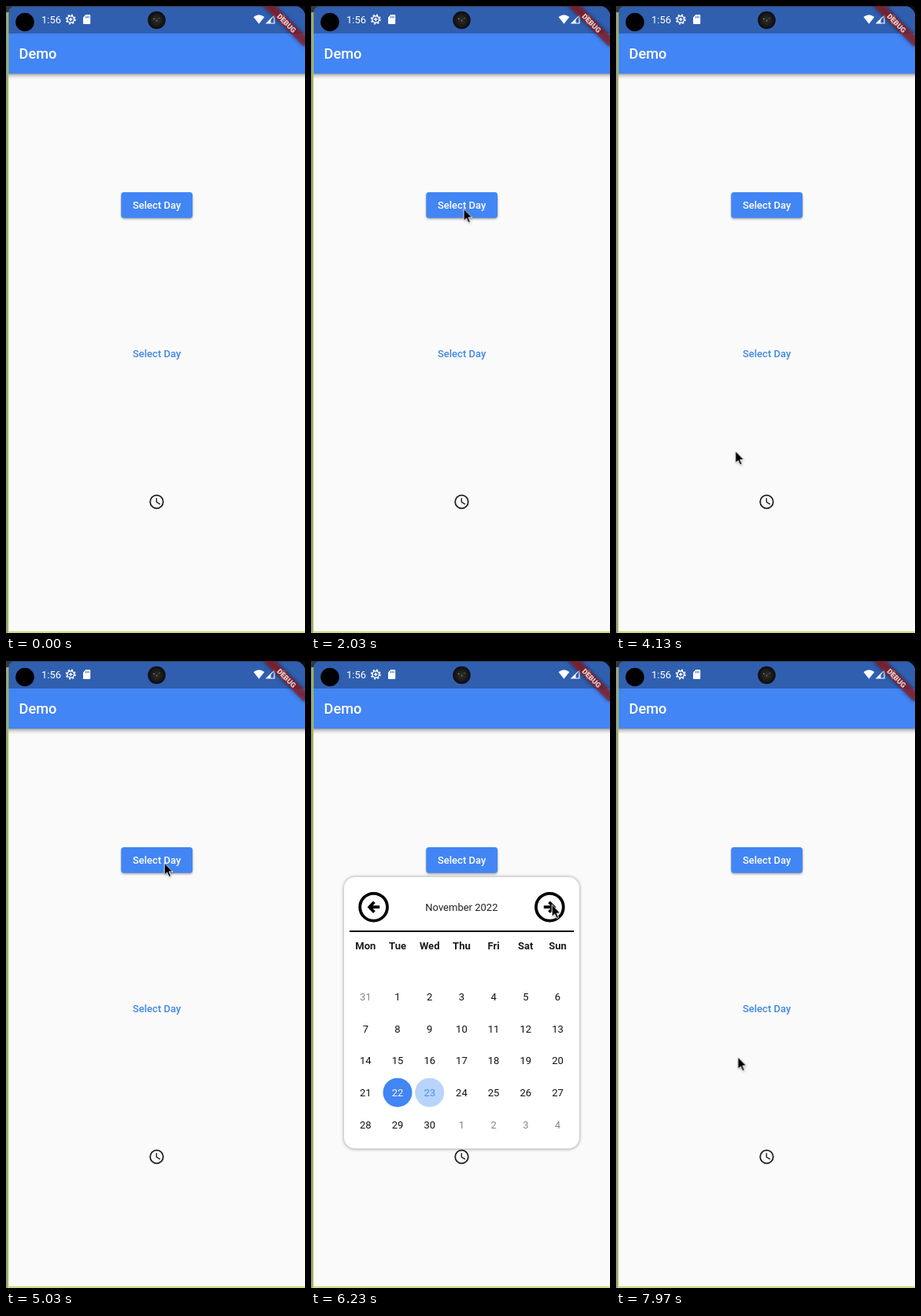
An HTML page that plays this animation: 380 px wide and 798 px high, repeating every 8000 ms.

```html
<!DOCTYPE html>
<html lang="en">
<head>
<meta charset="utf-8">
<title>Day picker demo</title>
<style>
  html, body { margin: 0; width: 100%; height: 100%; overflow: hidden; background: #fafafa; }
  svg { display: block; width: 100%; height: 100%; }
  text { font-family: Roboto, sans-serif; font-size: 13px; }
  .mid { text-anchor: middle; }
  .medium { font-weight: 500; }
  .bold { font-weight: 700; }
</style>
</head>
<body>
<svg viewBox="0 0 380 798" preserveAspectRatio="none">
  <defs>
    <linearGradient id="fall" x2="0" y2="1">
      <stop offset="0" stop-opacity=".38"/>
      <stop offset=".4" stop-opacity=".14"/>
      <stop offset="1" stop-opacity="0"/>
    </linearGradient>
    <radialGradient id="lens">
      <stop offset="0" stop-color="#30302c"/>
      <stop offset=".6" stop-color="#1b1b1a"/>
      <stop offset="1" stop-color="#0c0c0e"/>
    </radialGradient>
    <filter id="soft" x="-20%" y="-60%" width="140%" height="220%"><feGaussianBlur stdDeviation="1.5"/></filter>
    <filter id="halo" x="-5%" y="-5%" width="110%" height="110%"><feGaussianBlur stdDeviation="2"/></filter>
    <filter id="blur" x="-20%" y="-80%" width="140%" height="260%"><feGaussianBlur stdDeviation="2.5"/></filter>
    <clipPath id="pane"><rect x="49" y="347" width="285" height="268"/></clipPath>
    <g id="arrow" fill="none" stroke="#000">
      <circle r="17.4" stroke-width="3.8"/>
      <path d="M.8-6.4-5.4 0 .8 6.4M-4.5 0H7.6" stroke-width="3.8"/>
    </g>
  </defs>

  <!-- screen and bars -->
  <rect width="380" height="798" fill="#fafafa"/>
  <rect x="3" y="86" width="377" height="7" fill="url(#fall)"/>
  <rect x="3" y="35" width="377" height="51" fill="#4285f4"/>
  <rect x="3" width="377" height="35" fill="#305fb0"/>
  <rect width="2" height="798" fill="#969a94"/>
  <path d="M2.6 8V796.9H380" fill="none" stroke="#a9cb35" stroke-width="1.3"/>
  <path d="M0 0H380V.8H9Q4 2 3 8H0Z" fill="#35383c"/>
  <path d="M370 0H380V10Q378 3 370 0Z" fill="#0b0b0d"/>
  <circle cx="24" cy="20.5" r="11.8"/>
  <circle cx="191.5" cy="18" r="11.3" fill="url(#lens)"/>
  <path d="M187 16.4h1.6M191 18.6h1.2M194.5 15.5h1" stroke="#8d8d80" stroke-width="1.2"/>

  <!-- status icons -->
  <g fill="#fff">
    <text x="45" y="22">1:56</text>
    <g transform="translate(82.3 17)" fill="none" stroke="#fff">
      <circle r="4.3" stroke-width="1.4"/>
      <circle r="5.7" stroke-width="1.6" stroke-dasharray="2.2 2.277"/>
      <path d="M-2.2 0H2.2M0-2.2V2.2" stroke-width="1.3"/>
    </g>
    <path d="M101.4 11H106.2Q107.2 11 107.2 12V22Q107.2 23 106.2 23H99Q98 23 98 22V14.5Z"/>
    <path d="M101.4 13v2.4M103.3 13v2.4M105.2 13v2.4" stroke="#305fb0" stroke-width=".9"/>
    <path d="M321.5 22.7 314.6 14.1Q321.5 8.3 328.4 14.1Z"/>
    <path d="M341 12.2V22H331.2Z" fill="none" stroke="#fff" stroke-width="1.2"/>
    <path d="M336.5 16.6V22h-5Z"/>
    <path d="M350 12.6h1.3v-1.2h2.4v1.2h1.3V23h-5Z"/>
  </g>
  <g transform="translate(378.5 0) rotate(45)">
    <rect x="-36.4" y="25.5" width="72.8" height="10.9" opacity=".5" filter="url(#blur)"/>
    <rect x="-36.4" y="25.5" width="72.8" height="10.9" fill="#a51a1c" fill-opacity=".63"/>
    <text class="mid" y="34.3" fill="#e6d3d6" style="font-size:9.2px;font-weight:900">DEBUG</text>
  </g>

  <!-- page -->
  <text class="medium" x="16.6" y="67.4" fill="#fff" style="font-size:18.2px">Demo</text>
  <rect x="146.8" y="239" width="90" height="32" rx="3.6" opacity=".38" filter="url(#soft)"/>
  <rect x="146.3" y="237" width="90.8" height="32.8" rx="3.6" fill="#4285f4"/>
  <text class="mid medium" x="191.6" y="258.2" fill="#fff">Select Day</text>
  <text class="mid medium" x="191.6" y="447" fill="#4087e6">Select Day</text>
  <g transform="translate(191.5 631)" fill="none" stroke="#222" stroke-width="1.8">
    <circle r="8.3"/>
    <path d="M-.2-4.7V.4L4.4 3.1" stroke-width="1.4"/>
  </g>

  <!-- calendar -->
  <g id="cal" opacity="0">
    <rect x="42" y="275" width="299" height="346" rx="14" opacity=".42" filter="url(#halo)"/>
    <rect x="42" y="275" width="299" height="345.5" rx="14" fill="#fff"/>
    <use href="#arrow" x="79.6" y="313.2"/>
    <use href="#arrow" transform="translate(303.4 313.2) scale(-1 1)"/>
    <text id="title1" class="mid" x="191.4" y="318" fill="#222">November 2022</text>
    <text id="title2" class="mid" x="191.4" y="318" fill="#222" opacity="0">December 2022</text>
    <path d="M49 344H334" stroke="#000" stroke-width="1.8"/>
    <g clip-path="url(#pane)"><g id="pages"></g></g>
  </g>

  <g id="pointer" opacity="0">
    <path d="M.4.6V16.2L3.9 12.9 6.3 18.4 9 17.3 6.6 11.8H11.4Z" transform="translate(.4 1)" opacity=".3" filter="url(#soft)"/>
    <path d="M.2.4V15.8L3.8 12.5 6.1 18 8.6 16.9 6.3 11.5H11Z" stroke="#fff" stroke-width=".9"/>
  </g>
</svg>
<script>
const LOOP = 8000, PANE = 285;
const $ = id => document.getElementById(id);

function add(parent, tag, attrs, label) {
  const el = document.createElementNS('http://www.w3.org/2000/svg', tag);
  for (const k in attrs) el.setAttribute(k, attrs[k]);
  if (label !== undefined) el.textContent = label;
  parent.append(el);
  return el;
}

const colX = i => 69.3 + 40.7 * i;
const rowY = i => 427.4 + 40.6 * i;

function word(parent, x, y, label, fill, cls = '') {
  return add(parent, 'text', { x, y: y + 4.7, fill, class: 'mid ' + cls }, label);
}

function mark(parent, col, row, day, fill, ink) {
  const g = add(parent, 'g', {});
  add(g, 'circle', { cx: colX(col), cy: rowY(row), r: 18.5, fill });
  word(g, colX(col), rowY(row), day, ink);
  return g;
}

// Five weeks starting on the Monday on or before the 1st
function page(shift, lead, prevDays, days) {
  const g = add($('pages'), 'g', { transform: `translate(${shift} 0)` });
  'Mon Tue Wed Thu Fri Sat Sun'.split(' ')
    .forEach((d, i) => word(g, colX(i), 362.4, d, '#1c1c1c', 'bold'));
  for (let i = 0; i < 35; i++) {
    const n = i - lead + 1;
    const inside = n > 0 && n <= days;
    const day = n < 1 ? n + prevDays : inside ? n : n - days;
    word(g, colX(i % 7), rowY(Math.floor(i / 7)), day, inside ? '#111' : '#858585');
  }
  return g;
}

const nov = page(0, 1, 31, 30);
page(PANE, 3, 30, 31);
mark(nov, 1, 3, 22, '#4285f4', '#f4f8ff');
const picked = mark(nov, 2, 3, 23, '#b8d4fa', '#4a8fe6');

function play(el, frames) {
  el.animate(frames, { duration: LOOP, iterations: Infinity });
}

// steps: [time, opacity], each held until the next
function toggle(el, steps) {
  const frames = steps.map(([t, opacity]) => ({ offset: t / LOOP, opacity, easing: 'step-end' }));
  play(el, [...frames, { offset: 1, opacity: steps[steps.length - 1][1] }]);
}

// steps: [time, x, y, easing towards the next]
function travel(el, steps) {
  play(el, steps.map(([t, x, y, easing = 'linear']) =>
    ({ offset: t / LOOP, transform: `translate(${x}px, ${y}px)`, easing })));
}

toggle($('cal'), [[0, 0], [2370, 1], [4130, 0], [5170, 1], [7965, 0]]);
toggle(picked, [[0, 0], [4130, 1]]);
toggle($('title1'), [[0, 1], [6965, 0]]);
toggle($('title2'), [[0, 0], [6965, 1]]);
toggle($('pointer'), [[0, 0], [365, 1]]);

travel($('pages'), [
  [0, 0, 0], [6680, 0, 0, 'ease-out'], [6835, -PANE, 0], [LOOP, -PANE, 0]
]);

const glide = 'ease-in-out';
travel($('pointer'), [
  [0, 236, 800], [350, 236, 800, 'cubic-bezier(.3,.2,.3,1)'],
  [870, 193.8, 257.6], [2930, 193.8, 257.6, glide],
  [3230, 168.6, 447], [3360, 168, 446, glide],
  [3870, 151.5, 566], [4160, 151.5, 566, glide],
  [4670, 201, 256.6], [5330, 201, 256.6, glide],
  [5770, 276, 296], [5920, 276, 296, glide],
  [6230, 306, 309.6], [6950, 306, 309.6, 'cubic-bezier(.35,.1,.5,1)'],
  [7130, 161.6, 473, 'ease-out'], [7630, 154.6, 503.6], [LOOP, 154.6, 503.6]
]);
</script>
</body>
</html>
```
